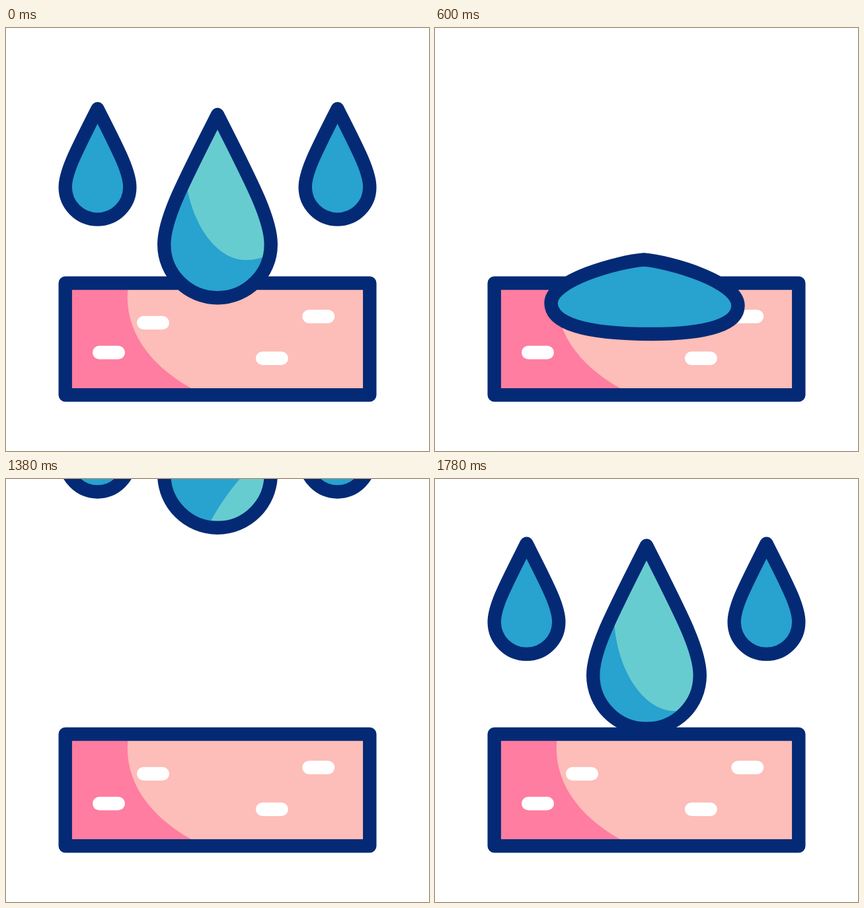
An HTML page with a canvas that plays this animation: 640 by 640 pixels, repeating every 1.8 s.

```html
<!DOCTYPE html>
<html lang="en">
<head>
<meta charset="utf-8">
<title>Absorbing drops</title>
<style>
  html, body { margin: 0; width: 100%; height: 100%; overflow: hidden; background: #fff; }
  canvas { display: block; width: 100vmin; height: 100vmin; }
</style>
</head>
<body>
<canvas id="stage" width="640" height="640"></canvas>
<script>
const ctx = document.getElementById('stage').getContext('2d');
const LOOP = 1800, STEP = 20, LINE = 20.4;
const NAVY = '#042a75', BLUE = '#28a2ce', TEAL = '#67ccd0';
const PINK = '#fe7da0', PEACH = '#fdbdb8';
const BOX = { l: 89.7, t: 386, r: 550.3, b: 555.2 };

const lerp = (a, b, k) => a + (b - a) * k;
const mix = (p, q, k) => p.map((v, i) => lerp(v, q[i], k));

// Closed outline through four points. Handle lengths are fractions of each
// quarter: flare and fall at the tip, rise at the sides, round at the bottom.
function blob({ tip, left, right, bottom, flare, fall, rise, round }) {
  const side = p => ({
    shoulder: [lerp(tip[0], p[0], flare), lerp(tip[1], p[1], fall)],
    upper: [p[0], lerp(p[1], tip[1], rise)],
    lower: [p[0], lerp(p[1], bottom[1], round)],
    base: [lerp(bottom[0], p[0], round), bottom[1]]
  });
  const l = side(left), r = side(right);
  return [tip, r.shoulder, r.upper, right, r.lower, r.base, bottom,
    l.base, l.lower, left, l.upper, l.shoulder, tip].flat();
}

function drop(x, y, r) {
  return blob({
    tip: [x, y - r * 2.43], left: [x - r, y], right: [x + r, y], bottom: [x, y + r],
    flare: 0.64, fall: 0.523, rise: 0.2, round: 0.552
  });
}

const sideDrops = [drop(138.5, 240.8, 48.8), drop(501.5, 240.8, 48.8)];
const bigDrop = drop(320, 327.4, 80.8);
const squashed = blob({
  tip: [318.5, 228], left: [224.5, 390], right: [414.5, 391], bottom: [320, 460],
  flare: 0.46, fall: 0.36, rise: 0.233, round: 0.552
});
const puddle = blob({
  tip: [316, 350.5], left: [175.5, 416], right: [458.5, 420], bottom: [327, 463],
  flare: 0.27, fall: 0.045, rise: 0.53, round: 0.66
});
const wide = blob({
  tip: [309, 373.5], left: [148, 424], right: [489, 431], bottom: [327, 473],
  flare: 0.45, fall: 0, rise: 0.73, round: 0.62
});
const midX = (BOX.l + BOX.r) / 2, midY = (BOX.t + BOX.b) / 2;
const soaked = blob({
  tip: [midX, BOX.t], left: [BOX.l, midY], right: [BOX.r, midY], bottom: [midX, BOX.b],
  flare: 1, fall: 0, rise: 1, round: 1
});

const poses = [
  [0, bigDrop], [260, squashed], [540, mix(puddle, wide, -0.25)],
  [840, wide], [1100, soaked]
];

function poseAt(t) {
  const i = poses.findIndex(([end]) => t < end);
  if (i < 0) return soaked;
  const [t0, a] = poses[i - 1], [t1, b] = poses[i];
  return mix(a, b, (t - t0) / (t1 - t0));
}

function trace(s, dy) {
  const moved = s.map((v, i) => i % 2 ? v + dy : v);
  const path = new Path2D();
  path.moveTo(moved[0], moved[1]);
  for (let i = 2; i < moved.length; i += 6) path.bezierCurveTo(...moved.slice(i, i + 6));
  path.closePath();
  return path;
}

const shine = new Path2D(
  'M358-5C300 60 271 140 271 205C271 285 315 351 362 351C375 351 383 349 392 345L500 300V-5Z');
const glow = new Path2D('M184.3 396C179 455 214 508 280 545H540V396Z');
const pills = [[222.5, 446], [155.5, 491], [472.8, 436.5], [402.4, 499.7]];

function fill(path, color) {
  ctx.fillStyle = color;
  ctx.fill(path);
}

function outline(path) {
  ctx.strokeStyle = NAVY;
  ctx.lineWidth = LINE;
  ctx.lineJoin = 'round';
  ctx.stroke(path);
}

// The highlight stays in place and shows only inside a shiny drop.
function drawDrop(shape, dy, shiny) {
  const path = trace(shape, dy);
  fill(path, BLUE);
  if (shiny) {
    ctx.save();
    ctx.clip(path);
    fill(shine, TEAL);
    ctx.restore();
  }
  outline(path);
}

function drawBlock() {
  const { l, t, r, b } = BOX, path = new Path2D();
  path.rect(l, t, r - l, b - t);
  fill(path, PINK);
  fill(glow, PEACH);
  ctx.strokeStyle = '#fff';
  ctx.lineWidth = LINE;
  ctx.lineCap = 'round';
  for (const [x, y] of pills) {
    ctx.beginPath();
    ctx.moveTo(x - 14.3, y);
    ctx.lineTo(x + 14.3, y);
    ctx.stroke();
  }
  outline(path);
}

function draw(t) {
  ctx.fillStyle = '#fff';
  ctx.fillRect(0, 0, 640, 640);

  // Falling drops pass behind the block.
  ctx.save();
  ctx.beginPath();
  ctx.rect(0, 0, 640, BOX.b);
  ctx.clip();
  if (t < 480) {
    for (const d of sideDrops) drawDrop(d, t * 0.577);
  } else if (t > 1200) {
    const left = LOOP + STEP - t;
    for (const d of sideDrops) drawDrop(d, -left * 0.614);
    drawDrop(bigDrop, -left * 0.76, true);
  }
  ctx.restore();

  drawBlock();
  if (t < 1140) {
    ctx.globalAlpha = Math.min(1, (1140 - t) / 140);
    drawDrop(poseAt(t), 0, true);
    ctx.globalAlpha = 1;
  }
}

const start = performance.now();
function tick() {
  const t = (performance.now() - start) % LOOP;
  draw(Math.floor(t / STEP) * STEP);
  requestAnimationFrame(tick);
}
tick();
</script>
</body>
</html>
```
